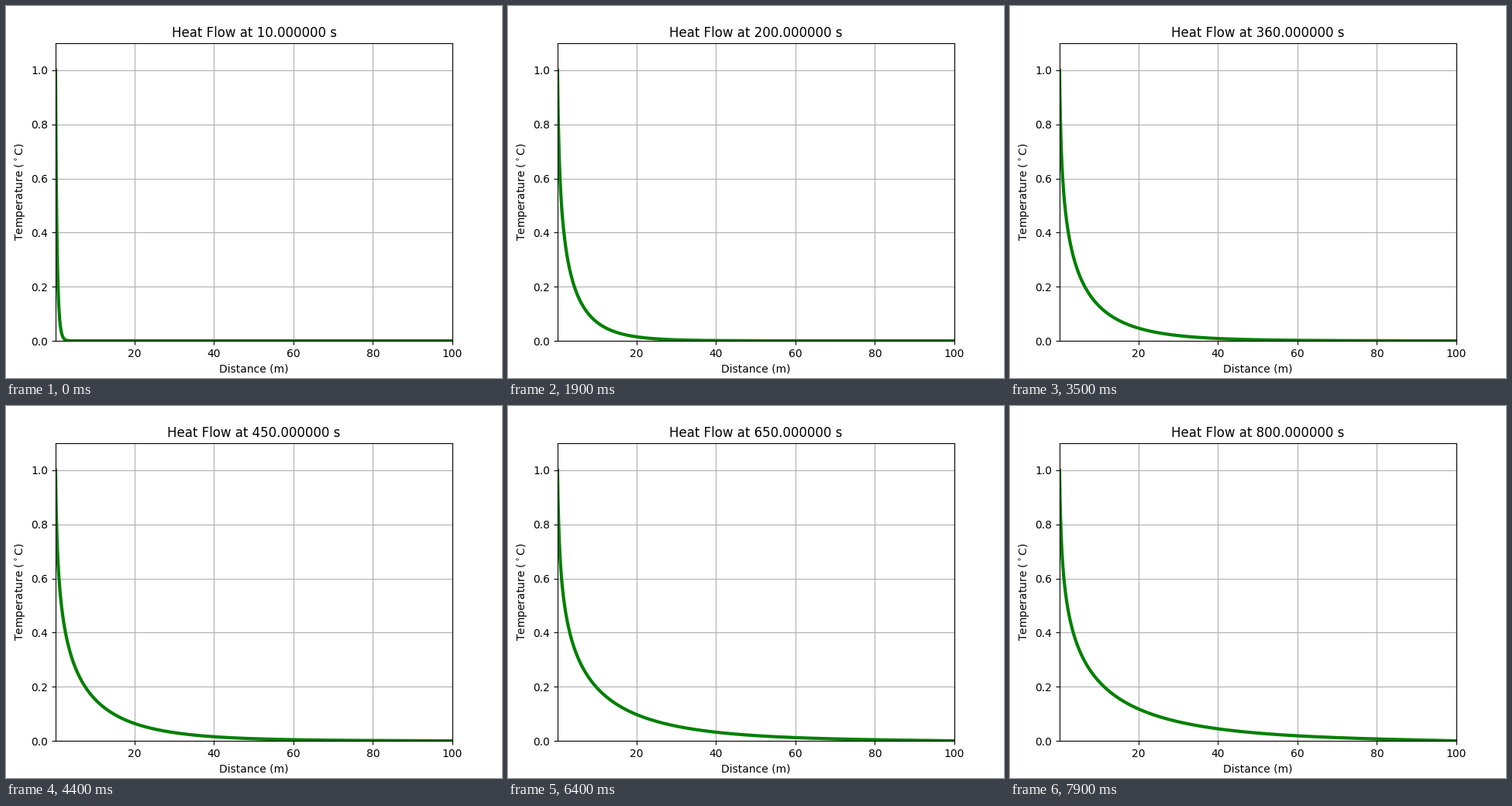
A matplotlib script for the animation above (8 s loop, 640 by 480 pixels).

```python
import numpy as np
import matplotlib.pyplot as plt
from matplotlib.animation import FuncAnimation

FRAMES = 80
INTERVAL = 100      # ms
STEP = 10.0         # simulated seconds per frame
CELLS = 1000
DR = 0.1
K = 0.041           # radial conduction rate, m/s

# Radial conduction du/dt = K (r u')', held at 1 on the inner edge, 0 on the outer.
n = np.arange(1, CELLS + 1)
r = n * DR
drop = np.concatenate([[0], np.cumsum(1 / n[1:])])
steady = 1 - drop / drop[-1]

inner = n[1:-1]
link = inner[1:].astype(float)
operator = np.diag(2.0 * inner + 1) - np.diag(link, 1) - np.diag(link, -1)
rates, modes = np.linalg.eigh(operator)
weights = modes.T @ -steady[1:-1]


def temperature(t):
    u = steady.copy()
    u[1:-1] += modes @ (np.exp(-rates * K / DR * t) * weights)
    return u


fig = plt.figure(figsize=(6.4, 4.8), dpi=100, facecolor="white")
ax = fig.add_axes([0.1, 0.1, 0.8, 0.8])
ax.set_xlim(r[0], r[-1])
ax.set_ylim(0, 1.1)
ax.set_xlabel("Distance (m)")
ax.set_ylabel(r"Temperature ($^\circ$C)")
ax.grid(True)
line, = ax.plot([], [], color="green", linewidth=3)
title = ax.set_title("")


def update(frame):
    t = STEP * (frame + 1)
    line.set_data(r, temperature(t))
    title.set_text(f"Heat Flow at {t:f} s")
    return line, title


anim = FuncAnimation(fig, update, frames=FRAMES, interval=INTERVAL,
                     repeat=True, repeat_delay=0, blit=False)
plt.show()
```
